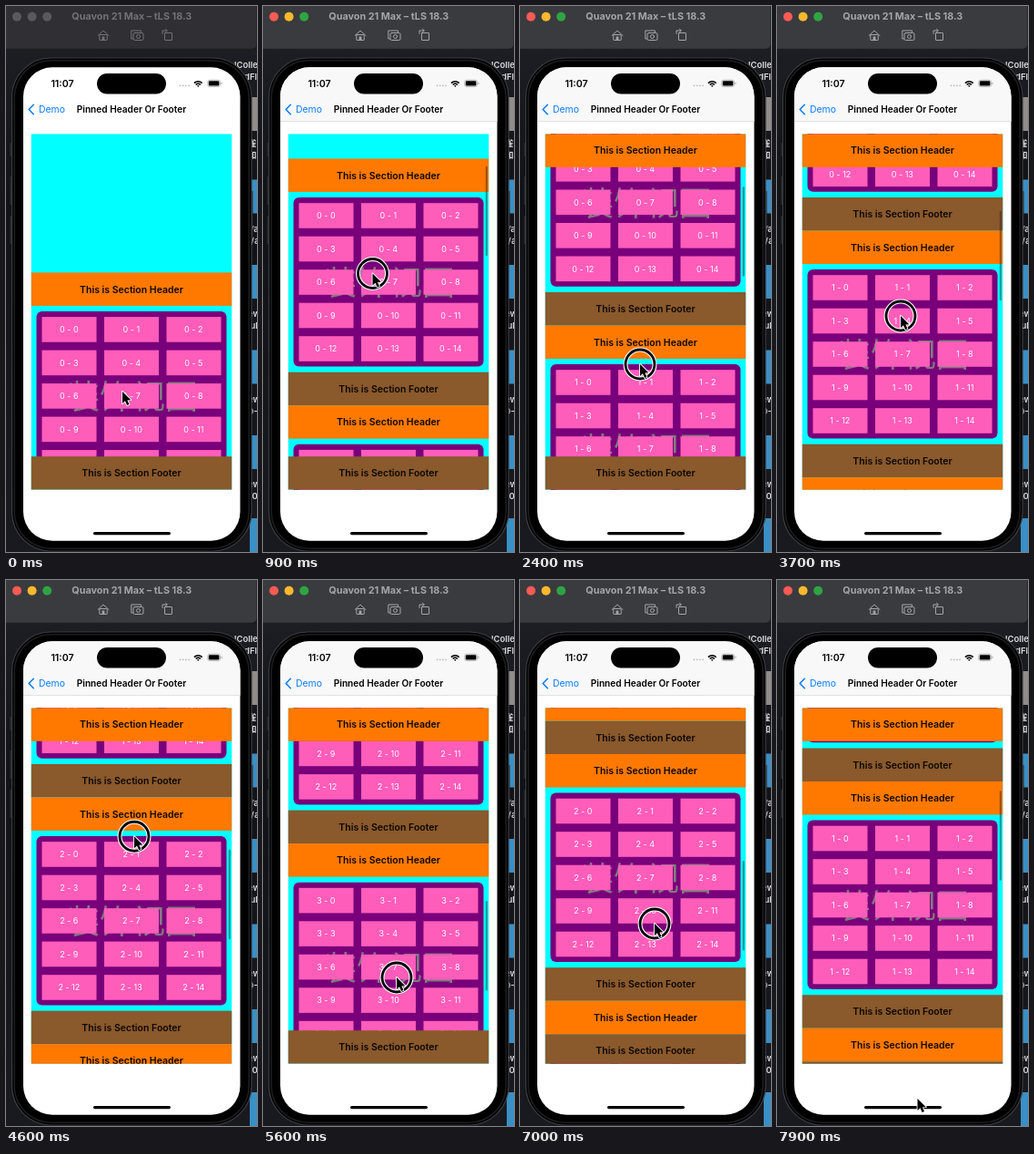
Animation of 276x599 px, one loop 8000 ms. Source, as an HTML page with a canvas:

```html
<!DOCTYPE html>
<html lang="en">
<head>
<meta charset="utf-8">
<title>Pinned Header Or Footer</title>
<style>
html, body { margin: 0; width: 100%; height: 100%; overflow: hidden; background: #141519; }
canvas { display: block; width: 276px; height: 599px; }
</style>
</head>
<body>
<canvas id="stage"></canvas>
<script>
const W = 276, H = 599, LOOP = 8000, STEP = 100;
const cv = document.getElementById('stage');
const c = cv.getContext('2d');
const dpr = window.devicePixelRatio || 1;
cv.width = W * dpr;
cv.height = H * dpr;

const UI = 'Inter, "Liberation Sans", sans-serif';
const CJK = '"Noto Sans CJK SC", "Noto Sans CJK", sans-serif';

// list geometry
const view = { x: 27.5, y: 140.3, w: 221, h: 390.4 };
const BAR = 36.5, BODY = 197.7, PERIOD = BAR * 2 + BODY, SECTIONS = 5;
const REST = 292.4, FLING_MS = 700;

// drags: press and release time, x, y at press and release, distance coasted afterwards
const drags = [
  [200, 900, 120.5, 418.4, 293.5, -40.7],
  [1900, 2400, 132, 440, 393, -54],
  [3200, 3700, 136, 390, 340, -110],
  [4300, 4700, 141, 450, 250, -148.8],
  [5200, 5600, 147, 476, 436, 0],
  [5850, 6250, 147, 300, 370, 25.6],
  [6500, 7000, 148, 300, 377, 300.7],
].map(([start, end, x, from, to, fling]) => ({ start, end, x, from, to, fling }));

const clamp = u => Math.min(1, Math.max(0, u));
const smooth = u => u * u * (3 - 2 * u);
const easeOut = u => 1 - (1 - u) ** 3;
const mix = (a, b, u) => a + (b - a) * u;

function listTop(t) {
  return drags.reduce((y, d) => y +
    (d.to - d.from) * smooth(clamp((t - d.start) / (d.end - d.start))) +
    d.fling * easeOut(clamp((t - d.end) / FLING_MS)), REST);
}

function pointer(t) {
  let last = { end: 0, x: 128, to: 423 };
  for (const d of drags) {
    if (t < d.start) return glide(last, d.start, d.x, d.from, t);
    if (t <= d.end) {
      const u = smooth((t - d.start) / (d.end - d.start));
      return { x: d.x, y: mix(d.from, d.to, u), down: true };
    }
    last = d;
  }
  return glide(last, 7900, 154.5, 569, t);
}
function glide(last, time, x, y, t) {
  const u = smooth(clamp((t - last.end) / (time - last.end)));
  return { x: mix(last.x, x, u), y: mix(last.to, y, u), down: false };
}

function rect(x, y, w, h, fill) {
  c.fillStyle = fill;
  c.fillRect(x, y, w, h);
}
function round(x, y, w, h, r, fill, stroke, lw = 1) {
  c.beginPath();
  c.roundRect(x, y, w, h, r);
  if (fill) { c.fillStyle = fill; c.fill(); }
  if (stroke) { c.strokeStyle = stroke; c.lineWidth = lw; c.stroke(); }
}
function disc(x, y, r, fill) {
  c.beginPath();
  c.arc(x, y, r, 0, Math.PI * 2);
  c.fillStyle = fill;
  c.fill();
}
function ring(x, y, r, lw, color) {
  c.beginPath();
  c.arc(x, y, r, 0, Math.PI * 2);
  c.lineWidth = lw;
  c.strokeStyle = color;
  c.stroke();
}
function line(points, color, lw = 1) {
  c.beginPath();
  points.forEach(([x, y]) => c.lineTo(x, y));
  c.strokeStyle = color;
  c.lineWidth = lw;
  c.stroke();
}
function text(s, x, y, size, color, weight = 400, align = 'center', family = UI) {
  c.font = `${weight} ${size}px ${family}`;
  c.textAlign = align;
  c.textBaseline = 'alphabetic';
  c.fillStyle = color;
  c.fillText(s, x, y + size * 0.36);
}

function desktop() {
  const g = c.createLinearGradient(0, 47, 0, H);
  g.addColorStop(0, '#1d1e23');
  g.addColorStop(0.3, '#111216');
  g.addColorStop(1, '#191a20');
  rect(0, 0, W, H, g);
  const label = (s, x, y) => text(s, x, y, 9.5, '#dcdcde', 600, 'left', 'Inter, ' + CJK);
  label('lCollec', 251, 65);
  label('dFl', 262, 78);
  rect(269, 100, 7, 37, '#8f8c89');
  // file icons, each with a two-line caption below
  const captions = ['雀名', '和看', 'Va', 't/a', 'ew', 'lule', 'ew', '0-3', 'ew', '-03'];
  for (let i = 0; i < 5; i++) {
    const y = 97 + i * 93.5;
    if (i) rect(268, y, 8, 37, '#3a8fc4');
    label(captions[i * 2], 266, y + 54);
    label(captions[i * 2 + 1], 266, y + 67);
  }
  rect(268, 562, 8, 37, '#3a8fc4');
}

function toolbar(active) {
  const ink = active ? '#a3a5a8' : '#737176';
  round(-6, -6, 281.5, 53.3, 6, active ? '#3a3b3f' : '#302f33');
  rect(0, 46.8, 275, 0.7, '#19191c');
  const lights = active ? ['#fb5b54', '#f9b92d', '#2fa443'] : Array(3).fill('#5b595d');
  lights.forEach((f, i) => disc(12 + i * 16.6, 11.7, 5, f));
  text('Quavon 21 Max – tLS 18.3', 138.3, 11.6, 10.8, ink, 700);
  c.lineJoin = 'round';
  // home
  line([[101, 32.5], [107, 27], [113, 32.5]], ink);
  round(102.8, 31.5, 8.4, 6, 0.5, null, ink);
  rect(105.6, 33.5, 2.8, 4, ink);
  // screenshot
  line([[139.5, 36], [137.8, 36], [137.8, 27], [148.5, 27], [148.5, 28.5]], ink);
  round(140, 29.5, 11, 8, 1.5, null, ink);
  ring(145.5, 33.5, 2, 1, ink);
  // rotate
  round(174.5, 29.5, 8, 8, 0.5, null, ink);
  line([[172, 30.5], [172, 27], [177, 27]], ink);
  line([[175.5, 25.3], [177.3, 27], [175.5, 28.7]], ink);
}

function phone(active) {
  for (const [y, h] of [[150, 15], [187, 31], [230, 31]]) rect(4.5, y, 3, h, '#2d2d30');
  rect(269, 203, 2.5, 50, '#2d2d30');
  round(6.5, 57, 263.5, 541, 43, '#000', '#3c3d41', 1.2);
  round(9.2, 59.7, 258, 535.6, 40.5, null, '#1d1d20', 1.6);
  c.save();
  c.beginPath();
  c.roundRect(19, 67.3, 238.5, 519.5, 32);
  c.clip();
  rect(19, 67, 239, 520, '#fff');
  if (active) {
    rect(19, 67, 239, 59.5, '#f8f8f8');
    rect(19, 126.2, 239, 0.6, '#d2d2d3');
  }
  c.restore();
  round(100, 74, 76, 22.5, 11.25, '#000');
  text('11:07', 62, 85.3, 10.6, '#000', 600);
  for (let i = 0; i < 4; i++) disc(191.5 + i * 3.2, 87.3, 0.9, '#b9b9bb');
  // wifi
  c.lineCap = 'butt';
  c.lineWidth = 1.6;
  c.strokeStyle = '#000';
  for (let r = 1; r < 8; r += 2.6) {
    c.beginPath();
    c.arc(211.3, 89, r, -Math.PI * 0.75, -Math.PI * 0.25);
    c.stroke();
  }
  // battery
  round(221.7, 81.2, 13.8, 7.4, 2.3, null, '#a9a9a9', 0.8);
  round(222.8, 82.3, 11.6, 5.2, 1.3, '#000');
  rect(236.5, 83.7, 1, 2.4, '#a9a9a9');
  c.lineCap = 'round';
  line([[30.3, 108.3], [25.2, 113.5], [30.3, 118.7]], '#0a7cff', 1.6);
  text('Demo', 36, 113.5, 10.4, '#0a7cff', 400, 'left');
  text('Pinned Header Or Footer', 138, 113.3, 10.15, '#000', 600);
  round(96, 577, 85, 3.2, 1.6, '#000');
}

function bar(y, fill, label) {
  rect(view.x, y, view.w, BAR, fill);
  text(label, 138, y + BAR / 2 + 0.1, 10.5, '#0b0704', 600);
}

function sectionBody(y, n) {
  round(33.5, y + 42.6, 209, 185.4, 6, '#78007a');
  text('装饰视图', 139, y + 136.8, 36, '#7f7c7f', 500, 'center', CJK);
  for (let i = 0; i < 15; i++) {
    const x = 39.5 + (i % 3) * 68.5, cy = y + 48.7 + Math.floor(i / 3) * 36.5;
    rect(x, cy, 60, 27.6, '#ff5dba');
    text(`${n} - ${i}`, x + 29.8, cy + 13.9, 9, '#fff');
  }
}

function list(top) {
  c.save();
  c.beginPath();
  c.rect(view.x, view.y, view.w, view.h);
  c.clip();
  rect(view.x, view.y, view.w, view.h, '#00ffff');
  const bottom = view.y + view.h;
  const tops = Array.from({ length: SECTIONS }, (_, i) => top + i * PERIOD);
  const seen = y => y < bottom && y + PERIOD > view.y;
  tops.forEach((y, n) => seen(y) && sectionBody(y, n));
  tops.filter(seen).forEach(y => {
    const foot = y + BAR + BODY;
    bar(Math.max(Math.min(foot, bottom - BAR), y + BAR), '#8a592c', 'This is Section Footer');
    bar(Math.min(Math.max(y, view.y), foot - BAR), '#ff7900', 'This is Section Header');
  });
  const s = REST - top;
  if (s > 1) round(244.8, 144 + s * 0.255, 2, 98.5, 1, 'rgba(40,40,40,.5)');
  c.restore();
}

function cursor({ x, y, down }) {
  if (down) {
    ring(x, y, 16, 5, '#fff');
    ring(x, y, 16, 2.8, '#050505');
  }
  c.beginPath();
  [[0, 0], [0, 13], [3, 10.3], [5.1, 15], [7.5, 14], [5.4, 9.4], [9.3, 9.2]]
    .forEach(([dx, dy]) => c.lineTo(x + dx, y + dy));
  c.closePath();
  c.lineJoin = 'round';
  c.strokeStyle = '#fff';
  c.lineWidth = 1.8;
  c.stroke();
  c.fillStyle = '#000';
  c.fill();
}

function draw(now) {
  const t = Math.floor((now % LOOP) / STEP) * STEP;
  const active = t >= drags[0].start;
  c.setTransform(dpr, 0, 0, dpr, 0, 0);
  desktop();
  toolbar(active);
  phone(active);
  list(listTop(t));
  cursor(pointer(t));
}

let start;
function tick(now) {
  start ??= now;
  draw(now - start);
  requestAnimationFrame(tick);
}
draw(0);
requestAnimationFrame(tick);
</script>
</body>
</html>
```
